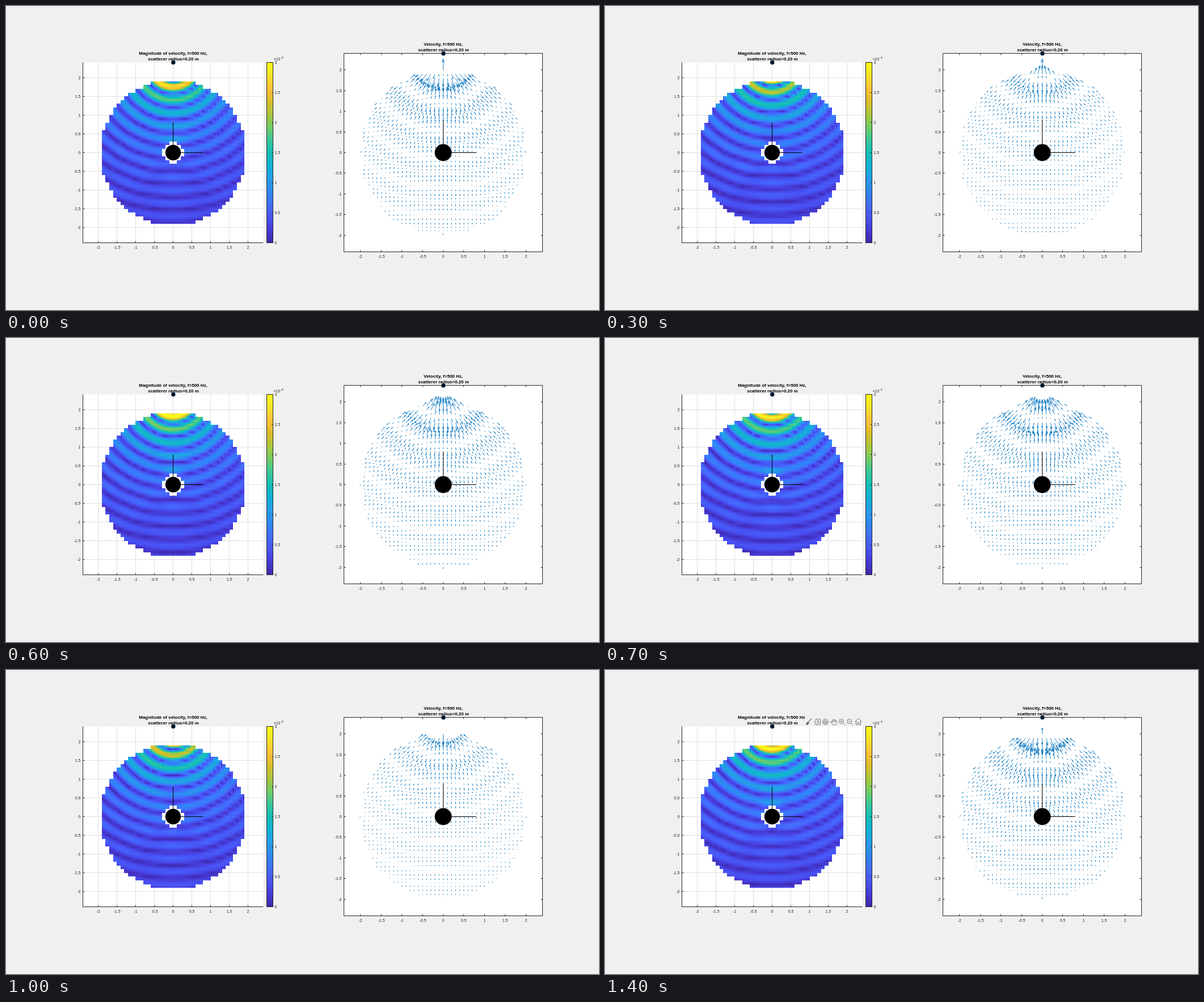
Recreate the animation shown at these times as an HTML page with a canvas. Size 1045x536 px, loop 1500 ms.

```html
<!DOCTYPE html>
<html lang="en">
<head>
<meta charset="utf-8">
<title>Sound field around a sphere</title>
<style>
html, body { margin: 0; width: 100%; height: 100%; overflow: hidden; background: #f0f0f0; }
canvas { display: block; }
</style>
</head>
<body>
<canvas id="stage" width="1045" height="536"></canvas>
<script>
const ctx = document.getElementById('stage').getContext('2d');
const FONT = '"Liberation Sans", Arial, sans-serif';
const INK = '#262626', BACK = '#f0f0f0';
const STEPS = 15, STEP_MS = 100, TOOLBAR_FROM = 12;
const K = 2 * Math.PI * 500 / 343, RADIUS = 0.2, SOURCE = 2.4, TERMS = 8;
const LEFT = { cx: 294.5, cy: 258.5, s: 66.2 };
const RIGHT = { cx: 770.5, cy: 258.5, s: 72.8 };
const px = (v, x) => v.cx + v.s * x;
const py = (v, y) => v.cy - v.s * y;

// ---- Point source scattered by a rigid sphere ----
const mul = ([a, b], [c, d]) => [a * c - b * d, a * d + b * c];
const div = (p, [c, d]) => mul(p, [c / (c * c + d * d), -d / (c * c + d * d)]);

// Spherical Hankel functions as [j, y] pairs
function hankel(x) {
  const s = Math.sin(x), c = Math.cos(x);
  const h = [[s / x, -c / x], [s / x / x - c / x, -c / x / x - s / x]];
  for (let n = 1; n < TERMS; n++)
    h.push(h[n].map((v, i) => (2 * n + 1) / x * v - h[n - 1][i]));
  return h;
}

const ka = K * RADIUS, hSurface = hankel(ka), hSource = hankel(K * SOURCE);
const coeff = Array.from({ length: TERMS }, (_, n) => {
  const slope = hSurface[n].map((v, i) => n / ka * v - hSurface[n + 1][i]);
  const c = mul(div([slope[0], 0], slope), hSource[n]);
  return mul([0, -K * (2 * n + 1)], c);
});

function pressure(x, y) {
  const r = Math.hypot(x, y), d = Math.hypot(x, y - SOURCE), mu = y / r;
  let re = Math.cos(K * d) / d, im = Math.sin(K * d) / d;
  const h = hankel(K * r);
  for (let n = 0, p = 1, prev = 0; n < TERMS; n++) {
    const t = mul(coeff[n], h[n]);
    re += t[0] * p;
    im += t[1] * p;
    [p, prev] = [((2 * n + 1) * mu * p - n * prev) / (n + 1), p];
  }
  return [re, im];
}

// Complex velocity component: difference quotient divided by iK
function velocity(x, y, dx, dy) {
  const a = pressure(x + dx, y + dy), b = pressure(x - dx, y - dy);
  const w = 2 * (dx + dy) * K;
  return [(a[1] - b[1]) / w, (b[0] - a[0]) / w];
}

const N = 41, nodes = [];
for (let j = 0; j < N; j++) {
  for (let i = 0; i < N; i++) {
    const x = (i - 20) / 10, y = (j - 20) / 10, r = Math.hypot(x, y);
    nodes.push(r > 0.201 && r < 2.001
      ? { x, y, u: velocity(x, y, 1e-4, 0), v: velocity(x, y, 0, 1e-4) }
      : null);
  }
}

// ---- Colour map ----
const stops = [[62, 38, 168], [69, 58, 212], [72, 82, 244], [67, 109, 253], [46, 135, 247],
  [37, 157, 231], [18, 177, 214], [20, 190, 183], [55, 200, 151], [113, 205, 100],
  [171, 199, 57], [220, 189, 41], [254, 195, 56], [245, 227, 39], [249, 251, 21]];
function colour(t) {
  const p = Math.min(Math.max(t, 0), 1) * (stops.length - 1);
  const i = Math.min(Math.floor(p), stops.length - 2);
  return stops[i].map((c, n) => c + (stops[i + 1][n] - c) * (p - i));
}

// ---- Drawing helpers ----
function line(x1, y1, x2, y2, color = INK, width = 1) {
  ctx.strokeStyle = color;
  ctx.lineWidth = width;
  ctx.beginPath();
  ctx.moveTo(x1, y1);
  ctx.lineTo(x2, y2);
  ctx.stroke();
}
function text(s, x, y, align = 'center', size = 7, weight = '') {
  ctx.font = `${weight} ${size}px ${FONT}`;
  ctx.textAlign = align;
  ctx.fillStyle = weight ? '#000' : INK;
  ctx.fillText(s, x, y);
}
function disc(x, y, r, color) {
  ctx.fillStyle = color;
  ctx.beginPath();
  ctx.arc(x, y, r, 0, 2 * Math.PI);
  ctx.fill();
}
const crisp = v => Math.floor(v) + 0.5;

function axes(v, boxed) {
  const x0 = crisp(px(v, -2.4)), x1 = crisp(px(v, 2.4));
  const y0 = crisp(py(v, 2.4)), y1 = crisp(py(v, -2.4));
  ctx.fillStyle = '#fff';
  ctx.fillRect(x0, y0, x1 - x0, y1 - y0);
  for (let t = -2; t <= 2; t += 0.5) {
    const x = crisp(px(v, t)), y = crisp(py(v, t));
    if (!boxed) {
      line(x, y0, x, y1, '#dfdfdf');
      line(x0, y, x1, y, '#dfdfdf');
    }
    line(x, y1, x, y1 - 3);
    line(x0, y, x0 + 3, y);
    if (boxed) {
      line(x, y0, x, y0 + 3);
      line(x1, y, x1 - 3, y);
    }
    text(t, x, y1 + 10.5);
    text(t, x0 - 4, y + 2.5, 'right');
  }
  line(x0, y0, x0, y1);
  line(x0, y1, x1, y1);
  if (boxed) {
    line(x0, y0, x1, y0);
    line(x1, y0, x1, y1);
  }
}

function colourBar() {
  for (let y = 100; y < 418; y++) {
    ctx.fillStyle = `rgb(${colour((417.5 - y) / 318)})`;
    ctx.fillRect(460, y, 10, 1);
  }
  ctx.strokeStyle = INK;
  ctx.lineWidth = 1;
  ctx.strokeRect(459.5, 99.5, 11, 318);
  for (let t = 0; t <= 3; t += 0.5) {
    const y = crisp(417.5 - t * 106);
    line(468, y, 471, y);
    text(t, 473.5, y + 2.5, 'left');
  }
  text('×10', 471.5, 96, 'left');
  text('-4', 484, 92.5, 'left', 5.5);
}

function surface(phase) {
  const value = nodes.map(n => n ? 1.9 / 3 * Math.hypot(n.u(phase), n.v(phase)) : NaN);
  const x0 = 168, y0 = 132, size = 254;
  const img = ctx.getImageData(x0, y0, size, size);
  for (let y = 0; y < size; y++) {
    for (let x = 0; x < size; x++) {
      const gx = (x0 + x + 0.5 - LEFT.cx) / LEFT.s * 10 + 20;
      const gy = (LEFT.cy - y0 - y - 0.5) / LEFT.s * 10 + 20;
      const i = Math.floor(gx), j = Math.floor(gy), a = gx - i, b = gy - j;
      const k = j * N + i;
      const sw = value[k], se = value[k + 1], nw = value[k + N], ne = value[k + N + 1];
      if (isNaN(sw + se + nw + ne)) continue;
      const t = a + b < 1
        ? sw + a * (se - sw) + b * (nw - sw)
        : ne + (1 - a) * (nw - ne) + (1 - b) * (se - ne);
      img.data.set([...colour(t), 255], (y * size + x) * 4);
    }
  }
  ctx.putImageData(img, x0, y0);
}

function arrows(phase) {
  const list = nodes.filter(Boolean).map(n => ({ x: n.x, y: n.y, u: n.u(phase), v: n.v(phase) }));
  const scale = 0.27 * RIGHT.s / Math.max(...list.map(n => Math.hypot(n.u, n.v)));
  ctx.strokeStyle = '#0072bd';
  ctx.lineWidth = 0.85;
  ctx.beginPath();
  for (const n of list) {
    const x = px(RIGHT, n.x), y = py(RIGHT, n.y), u = n.u * scale, v = -n.v * scale;
    const tx = x + u, ty = y + v;
    ctx.moveTo(x, y);
    ctx.lineTo(tx, ty);
    ctx.moveTo(tx - 0.33 * u - 0.11 * v, ty - 0.33 * v + 0.11 * u);
    ctx.lineTo(tx, ty);
    ctx.lineTo(tx - 0.33 * u + 0.11 * v, ty - 0.33 * v - 0.11 * u);
  }
  ctx.stroke();
}

function bodies(v) {
  const x = crisp(v.cx), y = crisp(v.cy);
  line(x, y, x, py(v, 0.8), '#000');
  line(x, y, px(v, 0.8), y, '#000');
  disc(v.cx, v.cy, RADIUS * v.s + 0.4, '#000');
  disc(v.cx + 0.3, py(v, 2.4), 3.8, '#0b3a5e');
  disc(v.cx + 0.3, py(v, 2.4), 2.9, '#05121f');
}

function titles(v, first, y) {
  text(first, v.cx, y, 'center', 8, 'bold');
  text('scatterer radius=0.20 m', v.cx + 0.5, y + 10, 'center', 8, 'bold');
}

const icons = [
  [359, 'M5-6L-1 1M4-6L-2 0M-2 0Q-5 1-5 5Q-1 5 0 2Z', true],
  [374, 'M-3-5H5V5H-3L-3 2L-6 0L-3-2ZM-1-2H3M-1 0H3M-1 2H3'],
  [388, 'M-5 0A5 5 0 1 1 5 0A5 5 0 1 1-5 0M0-3L3-1V2L0 3L-3 2V-1ZM-3-1L0 0L3-1M0 0V3'],
  [403, 'M-3 1V-3Q-2-5-1-3V-4Q0-6 1-4V-3Q2-5 3-3V-1Q5-3 5-1V2Q4 5 2 5H-1Q-3 4-6 0Q-5-2-3 1M-1-3V0M1-3V0M3-2V0'],
  [417, 'M-5-1A4 4 0 1 1 3-1A4 4 0 1 1-5-1M2 2L6 6M-3-1H1M-1-3V1'],
  [431, 'M-5-1A4 4 0 1 1 3-1A4 4 0 1 1-5-1M2 2L6 6M-3-1H1'],
  [446, 'M-6 0L0-6L6 0M-4-2V5H-1V1H1V5H4V-2']
].map(([x, d, solid]) => ({ x, path: new Path2D(d), solid }));

function toolbar() {
  ctx.fillStyle = BACK;
  ctx.fillRect(353, 84, 101, 15);
  ctx.strokeStyle = ctx.fillStyle = '#6a6a6a';
  ctx.lineWidth = 0.9;
  for (const { x, path, solid } of icons) {
    ctx.save();
    ctx.translate(x + 0.5, 91.5);
    ctx.stroke(path);
    if (solid) ctx.fill(path);
    ctx.restore();
  }
}

// Instantaneous real part at a given phase
for (const n of nodes.filter(Boolean)) {
  for (const key of ['u', 'v']) {
    const [re, im] = n[key];
    n[key] = phase => re * Math.cos(phase) + im * Math.sin(phase);
  }
}

function draw(step) {
  const phase = 2 * Math.PI * step / STEPS;
  ctx.fillStyle = BACK;
  ctx.fillRect(0, 0, 1045, 536);
  axes(LEFT, false);
  axes(RIGHT, true);
  colourBar();
  surface(phase);
  arrows(phase);
  titles(LEFT, 'Magnitude of velocity, f=500 Hz,', 86);
  titles(RIGHT, 'Velocity, f=500 Hz,', 70);
  bodies(LEFT);
  bodies(RIGHT);
  if (step >= TOOLBAR_FROM) toolbar();
}

const start = performance.now();
let shown = -1;
function tick() {
  const step = Math.floor((performance.now() - start) / STEP_MS) % STEPS;
  if (step !== shown) draw(shown = step);
  requestAnimationFrame(tick);
}
tick();
</script>
</body>
</html>
```
